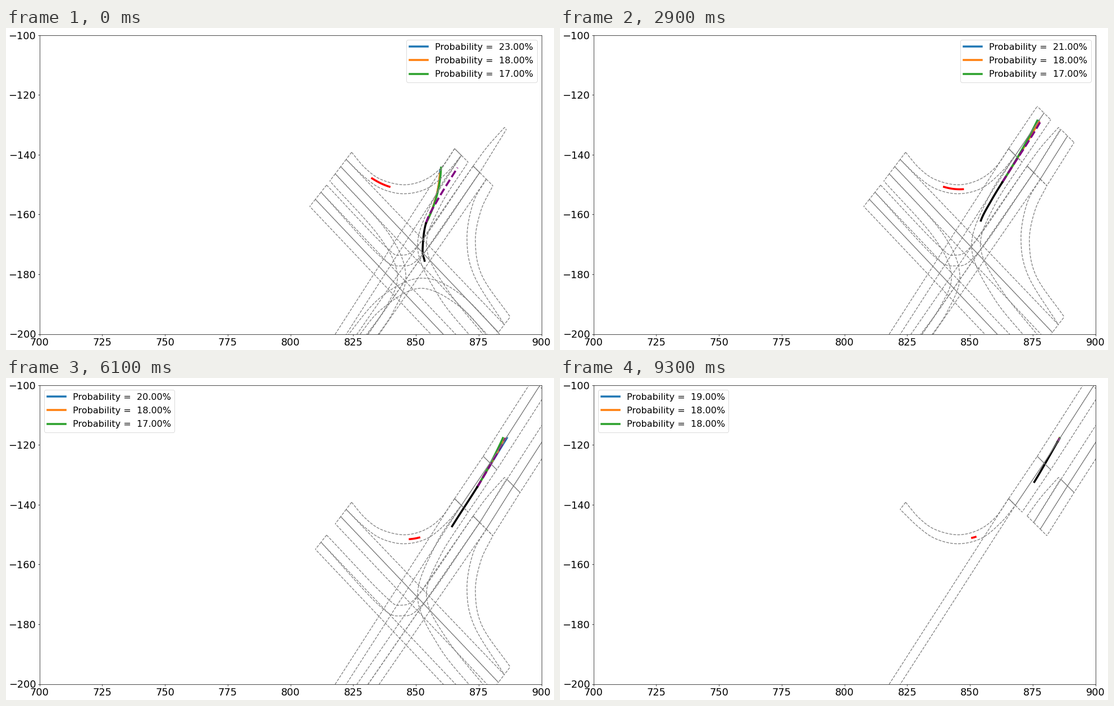
These frames come from a looping animation (976x574 px, 9.5 s). A matplotlib script:

```python
import numpy as np
import matplotlib.pyplot as plt
from matplotlib.animation import FuncAnimation
from matplotlib.transforms import Affine2D

W, H, DPI = 976, 574, 64
FRAMES, STEP = 95, 100
HOLDS = (88, 91, 94)  # the picture pauses on these steps
FLOOR = 560           # just below the visible area

plt.rcParams["font.family"] = "DejaVu Sans"
fig = plt.figure(figsize=(W / DPI, H / DPI), dpi=DPI, facecolor="white")
ax = fig.add_axes([59.5 / W, 28.5 / H, 894 / W, 533 / H])
ax.set(xlim=(700, 900), ylim=(-200, -100))
ax.set_yticks(range(-200, -99, 20))
ax.tick_params(labelsize=20)

# Geometry below is in stage pixels, y pointing down.
stage = Affine2D().scale(1, -1).translate(0, H)


def spline(pts, n=14):
    """Catmull-Rom curve through the points."""
    p = np.array(pts, float)
    if len(p) < 3:
        return p
    p = np.vstack([2 * p[0] - p[1], p, 2 * p[-1] - p[-2]])
    u = np.linspace(0, 1, n, endpoint=False)[:, None]
    parts = []
    for a, b, c, d in zip(p, p[1:], p[2:], p[3:]):
        parts.append(b + u * (c - a) / 2 + u**2 * (2 * a - 5 * b + 4 * c - d) / 2
                     + u**3 * (3 * b - a - 3 * c + d) / 2)
    return np.vstack(parts + [p[-2:-1]])


def stroke(pts=((0, 0),), **style):
    x, y = np.transpose(pts)
    return ax.plot(x, y, transform=stage, **style)[0]


def row(start, step, n):
    """Evenly spaced lane corners across a road."""
    return np.array(start) + np.arange(n)[:, None] * np.array(step)


def down(p, grade):
    """Where a straight border from p leaves the stage."""
    return p[0] + (FLOOR - p[1]) * grade, FLOOR


lanes = []


def lane(left, right, start=0, end=FRAMES, shift=2.65):
    """Dashed outline; shifted dashes make shared borders look solid."""
    a, b = spline(left), spline(right)
    sides = [(a, 0), ((a[0], b[0]), 0), (b, shift), ((a[-1], b[-1]), shift)]
    for pts, phase in sides:
        line = stroke(pts, color="gray", lw=1.5, zorder=4,
                      ls=(phase, (3.7, 1.6)))
        lanes.append((line, start, end))


def straights(near, far, **when):
    """Neighbouring lanes between two rows of corners."""
    for i in range(len(near) - 1):
        lane((near[i], far[i]), (near[i + 1], far[i + 1]), **when)


# Lane corners where each arm is cut off
nw_in = row((615.5, 221.5), (-9.7, 12.8), 5)
nw_out = row((571, 280), (-10, 12.7), 4)
se_in = row((898, 515), (-10.5, 13.8), 4)
ne_out = row((799, 215), (12, 12), 3)
ne_in = row((832, 246), (11.7, 11.7), 4)

# Straight lanes
straights(nw_in[1:3], se_in[1:3], end=89)
straights(nw_in[2:4], se_in[2:4], end=76)
nw_far = [down(p, 0.947) for p in nw_out]
straights(nw_out[1:3], nw_far[1:3], end=65)
straights(nw_out[2:], nw_far[2:], end=55)
straights(ne_out[:2], [down(p, -0.643) for p in ne_out[:2]])
sw_far = [down(p, -0.69) for p in ne_in]
straights(ne_in[:2], sw_far[:2], end=92, shift=0)
straights(ne_in[1:3], sw_far[1:3], end=85, shift=0)
straights(ne_out, ne_out + (51, -75.5), start=5)
straights(ne_out + (51, -75.5), ne_out + (139, -212.5), start=34)
straights(ne_in[1:], ne_in[1:] + (48.5, -77), start=10)
straights(ne_in[1:] + (48.5, -77), ne_in[1:] + (128.5, -201), start=45)
lane([ne_in[0], (857, 212), (888, 177)], [ne_in[1], (891, 181)])

# Turning lanes
lane([nw_in[0], (640, 250), (668, 270), (708, 279.5), (745, 271), (775, 249),
      ne_out[0]],
     [nw_in[1], (640, 267), (670, 287), (709, 295.5), (750, 286), (785, 258),
      ne_out[1]])
lane([nw_in[3], (680, 364), (712, 440), (690, 505), (653, FLOOR)],
     [nw_in[4], (665, 372), (697, 440), (677, 497), (632, FLOOR)], end=39)
lane([nw_out[0], (672, 386), (704, 405), (740, 380), ne_in[0]],
     [nw_out[1], (662, 403), (703, 424), (745, 400), ne_in[1]], end=79)
lane([ne_out[1], (765, 298), (733, 390), (772, 480), (836, FLOOR)],
     [ne_out[2], (773, 318), (749, 390), (785, 465), (861, FLOOR)], end=83)
lane([ne_in[2], (832, 312), (821, 376), (834, 442), se_in[1]],
     [ne_in[3], (846, 325), (836, 380), (848, 442), se_in[0]], end=78)
lane([(599, FLOOR), (665, 482), (738, 446), (810, 475), (892, FLOOR)],
     [(620, FLOOR), (668, 502), (738, 464), (810, 498), (866, FLOOR)], end=6)

# The car's whole path, sorted by y for lookup
car = spline([(745.5, 415), (742, 395), (748, 348), (769, 306), (801, 254),
              (845, 185), (890, 107)])[::-1]
rng = np.random.default_rng(4)
wobble = rng.normal(0, 1.5, (FRAMES, 3, 2))
DRIFT = np.array([(-30, 5), (-34, 10), (-27, 0)])  # first guesses err leftwards


def car_x(y):
    return np.interp(y, car[:, 1], car[:, 0])


def car_part(y0, y1):
    y = np.linspace(y0, y1, 40)
    return car_x(y), y


def forecast(tip, head):
    """Quadratic curve from the car to a predicted end point."""
    mid = (head + tip[1]) / 2
    u = np.linspace(0, 1, 20)
    a, b, c = (1 - u)**2, 2 * u * (1 - u), u**2
    return (a * car_x(head) + b * car_x(mid) + c * tip[0],
            a * head + b * mid + c * tip[1])


def captions(k):
    swing = 2.7 * np.exp(-k / 60) * np.cos(2 * np.pi * k / 27)
    third = 17.1 + 0.5 * np.cos(2 * np.pi * (k - 37) / 56)
    return [f"Probability =  {round(v):.2f}%" for v in (20 + swing, 18, third)]


guesses = [stroke(color=f"C{i}", lw=4, zorder=2, label=text)
           for i, text in enumerate(captions(0))]
future = stroke(color="purple", lw=4, ls="--", zorder=3)
past = stroke(color="black", lw=4, zorder=3)
red = stroke(color="red", lw=4, zorder=3)
legend = ax.legend(handles=guesses, fontsize=18, loc="upper right",
                   labelspacing=0.57)


def update(i):
    k = i - 1 if i in HOLDS else i
    t = k / 10
    for line, start, end in lanes:
        line.set_visible(start <= k < end)

    tail, head = 415 - 24.7 * t, 348 - 25.2 * t
    goal = max(107, 249 - 32 * t + 0.9 * t**2)
    past.set_data(*car_part(tail, head))
    future.set_data(*car_part(head, goal))
    tips = ((car_x(goal), goal) + DRIFT * np.exp(-t / 1.8)
            + wobble[k] * (head - goal) / 100)
    for line, tip in zip(guesses, tips):
        line.set_data(*forecast(tip, head))

    x = np.linspace(min(734, 652 + 11 * t), 740 - 57 * (1 - t / 9.3)**2.5, 20)
    red.set_data(x, 287.5 - 0.0054 * (x - 712)**2)

    for label, text in zip(legend.get_texts(), captions(k)):
        label.set_text(text)
    legend.set_loc("upper right" if k < 34 else "upper left")


anim = FuncAnimation(fig, update, frames=FRAMES, interval=STEP, repeat=True,
                     repeat_delay=0, init_func=lambda: update(0))
plt.show()
```
